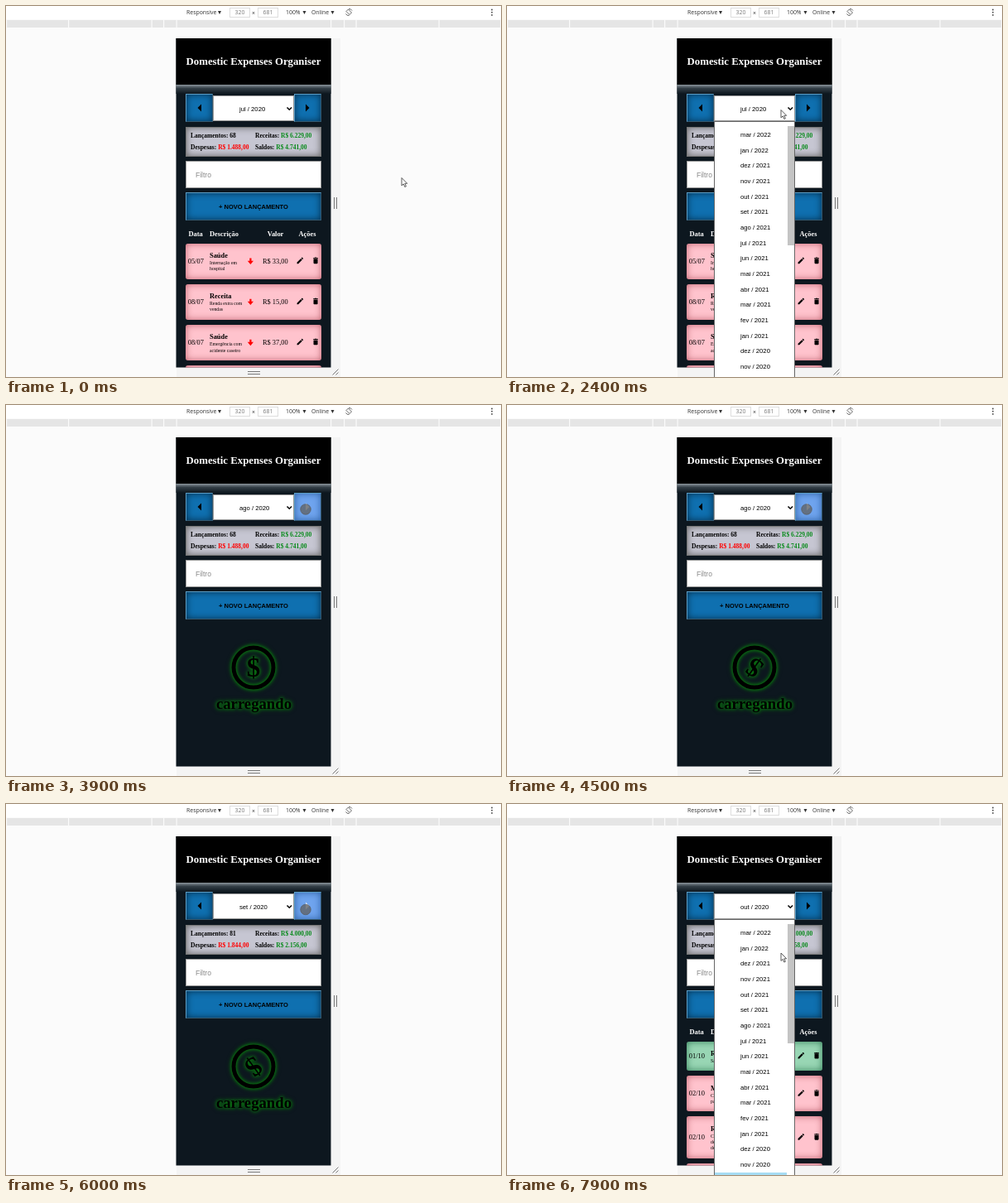
Write an HTML page that moves like this. It is 598 px wide and 448 px high and loops after 8000 ms.

```html
<!DOCTYPE html>
<html lang="pt">
<head>
<meta charset="utf-8">
<title>Domestic Expenses Organiser</title>
<style>
  html, body { margin: 0; width: 100%; height: 100%; overflow: hidden; background: #fbfbfb; }
  #stage { position: relative; width: 598px; height: 448px; overflow: hidden; background: #fbfbfb; }
  #stage div, svg { position: absolute; box-sizing: border-box; }
  svg, .layer { left: 0; top: 0; width: 598px; height: 448px; }
  #phone { clip-path: inset(39px 205.5px 11.5px 205.5px); background: #0d171f; }
  #head { left: 205px; top: 39px; width: 188px; height: 55.5px; background: #000; }
  #glow { left: 205px; top: 94.5px; width: 188px; height: 11px; background: linear-gradient(#8b959c, #343f47 40%, #0d171f); }
  .btn { background: #0f70b0; border: 1px outset #5b9cc4; box-shadow: inset 0 0 9px #05304f; }
  .btn.hot { background: #6fa4ee; box-shadow: inset 0 0 8px #2f62a6; }
  .field { background: #fff; border: 1px solid #999; }
  #stats { left: 217px; top: 146px; width: 164px; height: 35.5px; background: #c6c6d2; border: 1px solid #777; box-shadow: inset 0 0 9px #666; }
  .row { left: 217px; width: 164px; border-radius: 3px; background: #ffc3cd; box-shadow: inset 0 0 9px rgba(150, 35, 50, .6); }
  .row.in { background: #98d6b4; box-shadow: inset 0 0 9px rgba(10, 90, 50, .7); }
  text { font: 8.4px "Liberation Serif", serif; white-space: pre; }
  .b { font-weight: bold; }
  .w { fill: #fff; }
  .tiny { font-size: 5.8px; }
  .sum { font: bold 7.5px "Liberation Serif", serif; }
  .ui { font: 7.7px "Liberation Sans", sans-serif; }
  .bar { font: 6.9px "Open Sans", sans-serif; fill: #333; }
  .red { fill: #f00; }
  .green { fill: #078a1a; }
  #load { filter: drop-shadow(0 0 2px #0a7d12) drop-shadow(0 0 2px #075c0d); }
  #menu { left: 250px; top: 139px; width: 98px; height: 320px; background: #fff; border: 1px solid #666; }
  #thumb { left: 338.5px; top: 145px; width: 8px; height: 144px; background: #c4c4c4; }
  #pick { left: 251px; top: 444.5px; width: 87px; height: 4px; background: #a6dcf4; }
</style>
</head>
<body>
<div id="stage">
  <svg id="chrome"></svg>
  <div id="phone" class="layer">
    <div id="head"></div><div id="glow"></div>
    <div class="btn" style="left:217px;top:106px;width:33px;height:34px"></div>
    <div class="btn" id="next" style="left:348px;top:106px;width:33px;height:34px"></div>
    <div class="field" style="left:250px;top:108px;width:98px;height:31px"></div>
    <div id="stats"></div>
    <div class="field" style="left:217px;top:187px;width:164px;height:33px"></div>
    <div class="btn" style="left:217px;top:225px;width:164px;height:33.5px"></div>
    <svg id="form"></svg>
    <div id="list" class="layer"></div>
    <svg id="wait"></svg>
  </div>
  <div id="drop" class="layer">
    <div id="menu"></div><div id="thumb"></div><div id="pick"></div>
    <svg id="items"></svg>
  </div>
  <svg id="mouse">
    <circle id="touch" r="6.3" fill="#606060" fill-opacity=".76" stroke="#555" stroke-opacity=".6"/>
    <path id="arrow" d="M0 0V9.4L2.2 7.4L3.8 11L5.4 10.3L3.8 6.8H6.7Z" fill="#fff" stroke="#333" stroke-width=".8"/>
  </svg>
</div>
<script>
const $ = id => document.getElementById(id);
const show = (id, on) => $(id).style.display = on ? '' : 'none';
const text = (x, y, s, cls = '', more = '') => `<text x="${x}" y="${y}" class="${cls}" ${more}>${s}</text>`;
const path = (d, more = '') => `<path d="${d}" ${more}/>`;
const rect = (x, y, w, h, fill, more = '') => `<rect x="${x}" y="${y}" width="${w}" height="${h}" fill="${fill}" ${more}/>`;
const MID = 'text-anchor="middle"';

const NAMES = ['jan', 'fev', 'mar', 'abr', 'mai', 'jun', 'jul', 'ago', 'set', 'out', 'nov', 'dez'];
const label = n => `${NAMES[n % 12]} / ${Math.floor(n / 12)}`;

// rows: date, title, description lines, value, income flag
const MONTHS = [
  { sum: ['68', '6.229', '1.488', '4.741'], rows: [
    ['05/07', 'Saúde', ['Internação em', 'hospital'], '33,00'],
    ['08/07', 'Receita', ['Renda extra com', 'vendas'], '15,00'],
    ['08/07', 'Saúde', ['Emergência com', 'acidente caseiro'], '37,00'],
    ['09/07', 'Lazer', ['Passeio no', 'parque'], '20,00']] },
  { sum: ['81', '4.000', '1.844', '2.156'], rows: [
    ['01/08', 'Receita', ['Salário mensal'], '4.000,00', 1],
    ['02/08', 'Mercado', ['Compras de', 'padaria'], '21,00'],
    ['02/08', 'Saúde', ['Consulta com', 'dentista'], '35,00'],
    ['03/08', 'Lazer', ['Cinema com', 'amigos'], '18,00']] },
  { sum: ['75', '4.000', '1.958', '2.042'], rows: [
    ['01/09', 'Receita', ['Salário mensal'], '4.000,00', 1],
    ['01/09', 'Transporte', ['Passagem de', 'ônibus'], '12,00'],
    ['03/09', 'Mercado', ['Compras de', 'feira'], '27,00'],
    ['04/09', 'Saúde', ['Remédios de', 'farmácia'], '31,00']] },
  { sum: ['75', '4.000', '1.842', '2.158'], rows: [
    ['01/10', 'Receita', ['Salário mensal'], '4.000,00', 1],
    ['02/10', 'Mercado', ['Compras de', 'padaria'], '24,00'],
    ['02/10', 'Restaurante', ['Comida fora', 'de casa com', 'desconto'], '38,00'],
    ['03/10', 'Lazer', ['Passeio no', 'parque'], '16,00']] }
];

const PENCIL = 'M3 17.25V21h3.75L17.81 9.94l-3.75-3.75L3 17.25zM20.71 7.04c.39-.39.39-1.02 0-1.41l-2.34-2.34c-.39-.39-1.02-.39-1.41 0l-1.83 1.83 3.75 3.75 1.83-1.83z';
const BIN = 'M6 19c0 1.1.9 2 2 2h8c1.1 0 2-.9 2-2V7H6v12zM19 4h-3.5l-1-1h-5l-1 1H5v2h14V4z';
const icon = (d, x, y) => path(d, `transform="translate(${x - 5} ${y - 5}) scale(.42)"`);

function buildChrome() {
  const tri = x => path(`M${x - 2} 6h4l-2 4z`, 'fill="#333"');
  let s = rect(0, 0, 598, 16, '#fff') + rect(0, 17, 598, 9, '#e5e5e5');
  for (const x of [0, 75, 175.5, 190, 205.5, 392, 408, 422.5, 522.5, 597]) s += rect(x, 17, 1.2, 9, '#fbfbfb');
  s += text(218, 10.2, 'Responsive', 'bar') + tri(258) + text(338, 10.2, '100%', 'bar') + tri(360.5)
    + text(369, 10.2, 'Online', 'bar') + tri(394.5) + text(299, 11, '×', 'bar', MID);
  for (const [x, v] of [[270, 320], [304, 681]])
    s += rect(x + .5, 2.5, 24, 11, '#fff', 'stroke="#ddd"') + text(x + 12.5, 10.2, v, 'bar', MID + ' style="fill:#777"');
  s += path('M411 6.5l2.5-2.5 4 4-2.5 2.5zM410.5 9.5a4 4 0 0 0 4 2M418 5.5a4 4 0 0 0-4-2', 'fill="none" stroke="#555" stroke-width=".9"');
  for (const y of [4.5, 7.7, 10.9]) s += `<circle cx="587" cy="${y}" r=".9" fill="#444"/>`;
  s += rect(392.5, 39, 11.5, 409, '#f4f4f4') + rect(206, 436.5, 198, 11.5, '#f4f4f4');
  s += path('M396.5 231v14M399.5 231v14M292 441.5h15M292 444.5h15M394.5 445.5l7-7M398.5 445.5l3-3', 'stroke="#777" stroke-width="1"');
  $('chrome').innerHTML = s;
}

function buildForm() {
  $('form').innerHTML =
    text(299, 71, 'Domestic Expenses Organiser', 'b w', MID + ' style="font-size:12.8px"')
    + path('M236 118.5v9l-4.5-4.5z') + path('M362 118.5v9l4.5-4.5z', 'id="fwd"')
    + path('M339.5 122.5l2.8 2.8 2.8-2.8', 'fill="none" stroke="#000" stroke-width="1.5"')
    + text(282, 126.7, '', 'ui', 'id="month"') + '<g id="sum"></g>'
    + text(229, 206.7, 'Filtro', 'ui', 'style="font-size:8.5px;fill:#888"')
    + rect(228.6, 199, .9, 9.5, '#000', 'id="caret"')
    + text(299, 244.8, '+ NOVO LANÇAMENTO', 'ui b', MID + ' style="font-size:7.5px;font-weight:bold"');
}

function sums([n, inc, out, left]) {
  const money = (v, c) => `<tspan class="${c}">R$ ${v},00</tspan>`;
  return text(223, 159.2, 'Lançamentos: ' + n, 'sum') + text(301, 159.2, 'Receitas: ' + money(inc, 'green'), 'sum')
    + text(223, 173.2, 'Despesas: ' + money(out, 'red'), 'sum') + text(301, 173.2, 'Saldos: ' + money(left, 'green'), 'sum');
}

function listHtml(rows) {
  let boxes = '', y = 286.5;
  let s = text(229, 278, 'Data', 'b w', MID) + text(246, 278, 'Descrição', 'b w')
    + text(325.5, 278, 'Valor', 'b w', MID) + text(364, 278, 'Ações', 'b w', MID);
  for (const [date, title, lines, value, income] of rows) {
    const h = 28.5 + 7.4 * lines.length, c = y + h / 2;
    boxes += `<div class="row ${income ? 'in' : ''}" style="top:${y}px;height:${h}px"></div>`;
    s += text(229.3, c + 2.4, date, '', MID) + text(246, y + 17.3, title, 'b');
    lines.forEach((l, i) => s += text(246, y + 25.6 + 7.2 * i, l, 'tiny'));
    s += path('M-1.1-3.6h2.2v3.1h2.5L0 3.8-3.6-.5h2.5z', `class="${income ? 'green' : 'red'}" transform="translate(295.4 ${c}) scale(1 ${income ? -1 : 1})"`)
      + text(325.3, c + 2.4, 'R$ ' + value, '', MID) + icon(PENCIL, 355.3, c - .8) + icon(BIN, 374, c - .8);
    y += h + 5.8;
  }
  return boxes + `<svg>${s}</svg>`;
}

function buildRest() {
  $('wait').innerHTML = '<g id="load"><circle cx="299" cy="317" r="24" fill="none" stroke="#000" stroke-width="5"/>'
    + text(0, 10.5, '$', 'b', MID + ' id="coin" style="font-size:33px"')
    + text(299.5, 367, 'carregando', 'b', MID + ' style="font-size:18.7px"') + '</g>';
  let s = text(282, 157.9, label(2022 * 12 + 2), 'ui');
  for (let i = 0; i < 15; i++) s += text(282, 176.6 + 18.67 * i, label(2022 * 12 - i), 'ui');
  $('items').innerHTML = s;
}

// pointer path: time, x, y
const TRACK = [[0, 478, 207.5], [100, 478, 207.5], [400, 522, 110], [900, 440, 10], [1400, 331, 125.5],
  [2500, 331, 125.5], [2700, 329, 120.5], [3100, 329, 120.5], [3700, 362, 126], [4500, 362, 126],
  [5600, 362, 127.5], [7300, 362, 127.5], [7600, 331, 125.5], [7700, 331, 125.5], [7900, 331, 180]];

function pointer(t) {
  const i = TRACK.findIndex(k => k[0] >= t);
  if (i < 1) return TRACK[0].slice(1);
  const a = TRACK[i - 1], b = TRACK[i], p = (t - a[0]) / (b[0] - a[0]), e = p * p * (3 - 2 * p);
  return [a[1] + (b[1] - a[1]) * e, a[2] + (b[2] - a[2]) * e];
}

const CLICK = [3900, 5600, 6700], FREEZE = [4900, 6100, 7300], LOADED = [5200, 6300, 7300];
const passed = (list, t) => list.filter(v => t >= v).length;
let shown = -1;

function draw(t) {
  const month = passed(CLICK, t), data = passed(LOADED, t), busy = month !== data;
  const open = t >= 1900 && t < 2900 || t >= 7800;
  if (data !== shown) {
    shown = data;
    $('sum').innerHTML = sums(MONTHS[data].sum);
    $('list').innerHTML = listHtml(MONTHS[data].rows);
  }
  $('month').textContent = label(2020 * 12 + 6 + month);
  show('list', !busy);
  show('wait', busy);
  if (busy) {
    const turn = (Math.min(t, FREEZE[month - 1]) - CLICK[month - 1]) * .36;
    $('coin').setAttribute('transform', `translate(299 317) rotate(${turn})`);
  }
  show('drop', open);
  show('pick', month === 3);
  show('caret', t >= 1700 && t < 2100);

  const [x, y] = pointer(t), inside = x > 206 && x < 392 && y > 39 && y < 436 && !open;
  const hot = inside && x > 349 && y > 106 && t > 3000;
  $('next').classList.toggle('hot', hot);
  $('fwd').setAttribute('fill', hot ? '#dce8f8' : '#000');
  show('touch', inside);
  show('arrow', !inside);
  $(inside ? 'touch' : 'arrow').setAttribute('transform', `translate(${x} ${y})`);
}

buildChrome();
buildForm();
buildRest();
function tick() {
  draw(Math.floor(performance.now() % 8000 / 100) * 100);
  requestAnimationFrame(tick);
}
tick();
</script>
</body>
</html>
```
